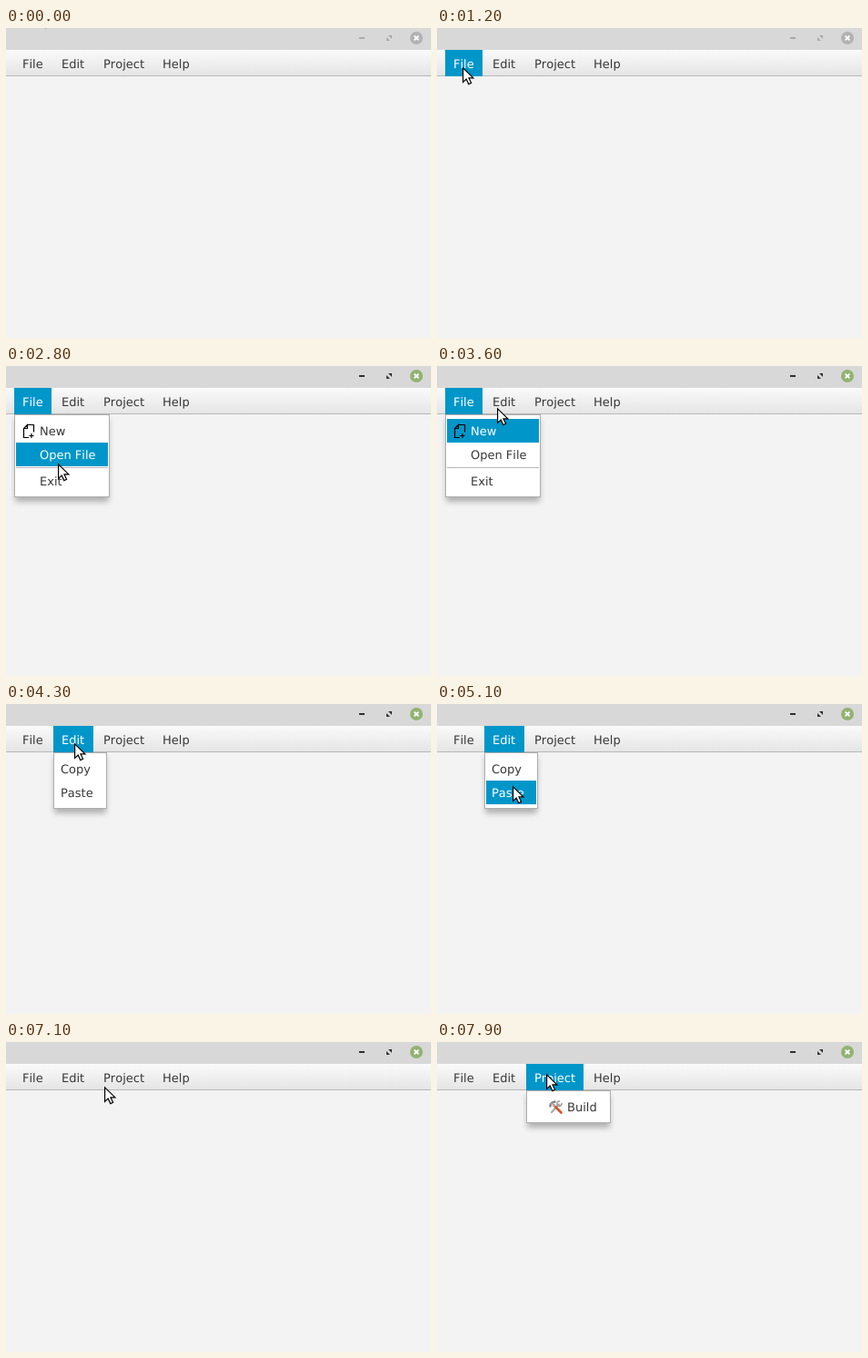
Write an HTML page that moves like this. It is 467 px wide and 340 px high and loops after 8000 ms.

```html
<!DOCTYPE html>
<html lang="en">
<head>
<meta charset="utf-8">
<title>Menu bar</title>
<style>
  html, body { margin: 0; width: 100%; height: 100%; overflow: hidden; background: #f3f3f3; }
  svg { display: block; width: 467px; height: 340px; }
  text {
    font: 13px "DejaVu Sans", sans-serif;
    font-kerning: none;
    text-rendering: geometricPrecision;
    fill: #383838;
  }
  .bg { fill: none; }
  .hot > .bg { fill: #0096c9; }
  .hot > text { fill: #fff; }
  .popup { visibility: hidden; }
  .popup.open { visibility: visible; }
  .shadow { fill: #000; opacity: .27; filter: blur(3px); }
  .glyph { fill: #a9a9a9; }
  .close { fill: #b2b2b2; }
  .active .glyph { fill: #303030; }
  .active .close { fill: #92b372; }
</style>
</head>
<body>
<svg viewBox="0 0 467 340">
  <defs>
    <linearGradient id="barFill" x2="0" y2="1">
      <stop offset="0" stop-color="#fafafa"/>
      <stop offset="1" stop-color="#e5e5e5"/>
    </linearGradient>
  </defs>
  <rect width="467" height="340" fill="#f3f3f3"/>
  <rect width="467" height="24" fill="#d8d8d8"/>
  <g id="buttons">
    <rect class="glyph" x="388" y="10" width="6" height="2"/>
    <path class="glyph" d="M420 8h4v4zM418 10v4h4z"/>
    <circle class="close" cx="451" cy="11" r="7"/>
    <path d="M448.6 8.6l4.8 4.8m0-4.8l-4.8 4.8" stroke="#fff" stroke-width="1.8"/>
  </g>
  <rect y="24" width="467" height="28" fill="url(#barFill)"/>
  <rect y="52" width="467" height="1" fill="#b8b8b8"/>
  <g id="bar"></g>
  <g id="popups"></g>
  <path id="cursor" d="M.6 .9V16.4L4.2 13L6.8 18.6L9.6 17.3L7 11.9H11.9Z"
    fill="#fff" stroke="#000" stroke-width="1.2"/>
</svg>
<script>
const LOOP = 8000, STEP = 100;
const BAR_TOP = 24, BAR_END = 53, ROW = 26, PAD = 5;
const $ = id => document.getElementById(id);

const icons = {
  New: `<path d="M23.5 64.5H30.5V72.5M25 78.5H19.5V68.5L23.5 64.5V68.5H19.5M25.5 76.5H30.5M28 74V79"
    fill="none" stroke="#000" stroke-width="1.2"/>`,
  Build: `<g fill="none" stroke-linecap="round">
    <path d="M126 77L134 68.5" stroke="#a9a9a9" stroke-width="2.2"/>
    <path d="M137 67.5A2.6 2.6 0 1 1 134.5 65" stroke="#999" stroke-width="1.5"/>
    <path d="M128.5 69.5L136.5 77.5" stroke="#d9532c" stroke-width="2.6"/>
    <path d="M124.5 70.5Q124 67 129.5 65.5" stroke="#858585" stroke-width="2.4"/>
    <path d="M126 68L129 70" stroke="#b5b5b5" stroke-width="2"/></g>`
};

const menus = [
  { name: 'File', x: 9, w: 41, popW: 105, indent: 28, items: ['New', 'Open File', '-', 'Exit'] },
  { name: 'Edit', x: 52, w: 44, popW: 59, indent: 8, items: ['Copy', 'Paste'] },
  { name: 'Project', x: 98, w: 63, popW: 93, indent: 45, items: ['Build'] },
  { name: 'Help', x: 163, w: 48, items: [] }
];

const rect = (x, y, w, h, extra) =>
  `<rect x="${x}" y="${y}" width="${w}" height="${h}" ${extra}/>`;

const cell = (name, x, y, w, h, textX, baseline) =>
  `<g data-cell="${name}">${rect(x, y, w, h, 'class="bg"')}` +
  `${icons[name] || ''}<text x="${textX}" y="${baseline}">${name}</text></g>`;

// Lays out the rows, notes each row's top edge and returns the markup
function popup(m) {
  let y = BAR_END + PAD, rows = '';
  const x = m.x + 2, w = m.popW - 4;
  m.rows = [];
  for (const label of m.items) {
    if (label === '-') {
      rows += rect(x, y + 1, w, 1, 'fill="#b8b8b8"');
      y += 3;
    } else {
      rows += cell(label, x, y, w, ROW, m.x + m.indent, y + 18);
      m.rows.push({ label, y });
      y += ROW;
    }
  }
  const h = y + PAD - BAR_END;
  return `<g class="popup" data-popup="${m.name}">` +
    rect(m.x + 1, BAR_END + 5, m.popW - 2, h, 'class="shadow"') +
    rect(m.x + .5, BAR_END + .5, m.popW - 1, h - 1, 'fill="#fff" stroke="#adadad"') +
    rows + '</g>';
}

$('bar').innerHTML = menus.map(m =>
  cell(m.name, m.x, BAR_TOP, m.w, BAR_END - BAR_TOP, m.x + 9, 44)).join('');
$('popups').innerHTML = menus.filter(m => m.items.length).map(popup).join('');

// Pointer moves: first step, last step, end point; each eases out
const home = [37, -19];
const moves = [
  [700, 1200, 28, 43],
  [2400, 2800, 57, 107],
  [2900, 3000, 61, 120],
  [3300, 3500, 65, 62],
  [3600, 3800, 66, 34],
  [4200, 4300, 75, 43],
  [4900, 5100, 83, 90],
  [5200, 5700, 110, 38],
  [5800, 5900, 133, 38],
  [6100, 6100, 134, 37],
  [6400, 6500, 134, 67],
  [7000, 7100, 108, 49],
  [7200, 7300, 86, 38],
  [7400, 7500, 120, 35]
];
const clicks = [1800, 6800, 7900];

function pointer(t) {
  let pos = home;
  for (const [first, last, ...end] of moves) {
    if (t < first) break;
    const p = Math.min(1, (t - first + STEP) / (last - first + STEP));
    const k = 1 - (1 - p) ** 2;
    pos = pos.map((v, i) => Math.round(v + (end[i] - v) * k));
  }
  return pos;
}

// Plays the menu's behaviour once; highlights trail the pointer by one step
function simulate() {
  const frames = [];
  let open, item;
  for (let t = 0; t < LOOP; t += STEP) {
    const [x, y] = pointer(t - STEP);
    const onBar = y >= BAR_TOP && y < BAR_END;
    const over = onBar && menus.find(m => x >= m.x && x < m.x + m.w);
    let hover = over || open;
    if (open && hover !== open) {
      open = hover;
      item = null;
    }
    if (open) {
      const row = open.rows.find(r => y >= r.y && y < r.y + ROW);
      if (row) item = row.label;
    }
    if (clicks.includes(t)) {
      open = open ? null : hover;
      hover = over || open;
      item = null;
    }
    frames.push({ pos: pointer(t), hover: hover?.name, open: open?.name, item, active: t >= clicks[0] });
  }
  return frames;
}

const frames = simulate();
const cells = [...document.querySelectorAll('[data-cell]')];
const popups = [...document.querySelectorAll('[data-popup]')];

function draw(t) {
  const { pos, hover, open, item, active } = frames[Math.floor(t / STEP)];
  for (const c of cells) c.classList.toggle('hot', [hover, item].includes(c.dataset.cell));
  for (const p of popups) p.classList.toggle('open', p.dataset.popup === open);
  $('buttons').classList.toggle('active', active);
  $('cursor').setAttribute('transform', `translate(${pos})`);
}

const start = performance.now();
function tick(now) {
  draw(Math.max(0, now - start) % LOOP);
  requestAnimationFrame(tick);
}
draw(0);
requestAnimationFrame(tick);
</script>
</body>
</html>
```
